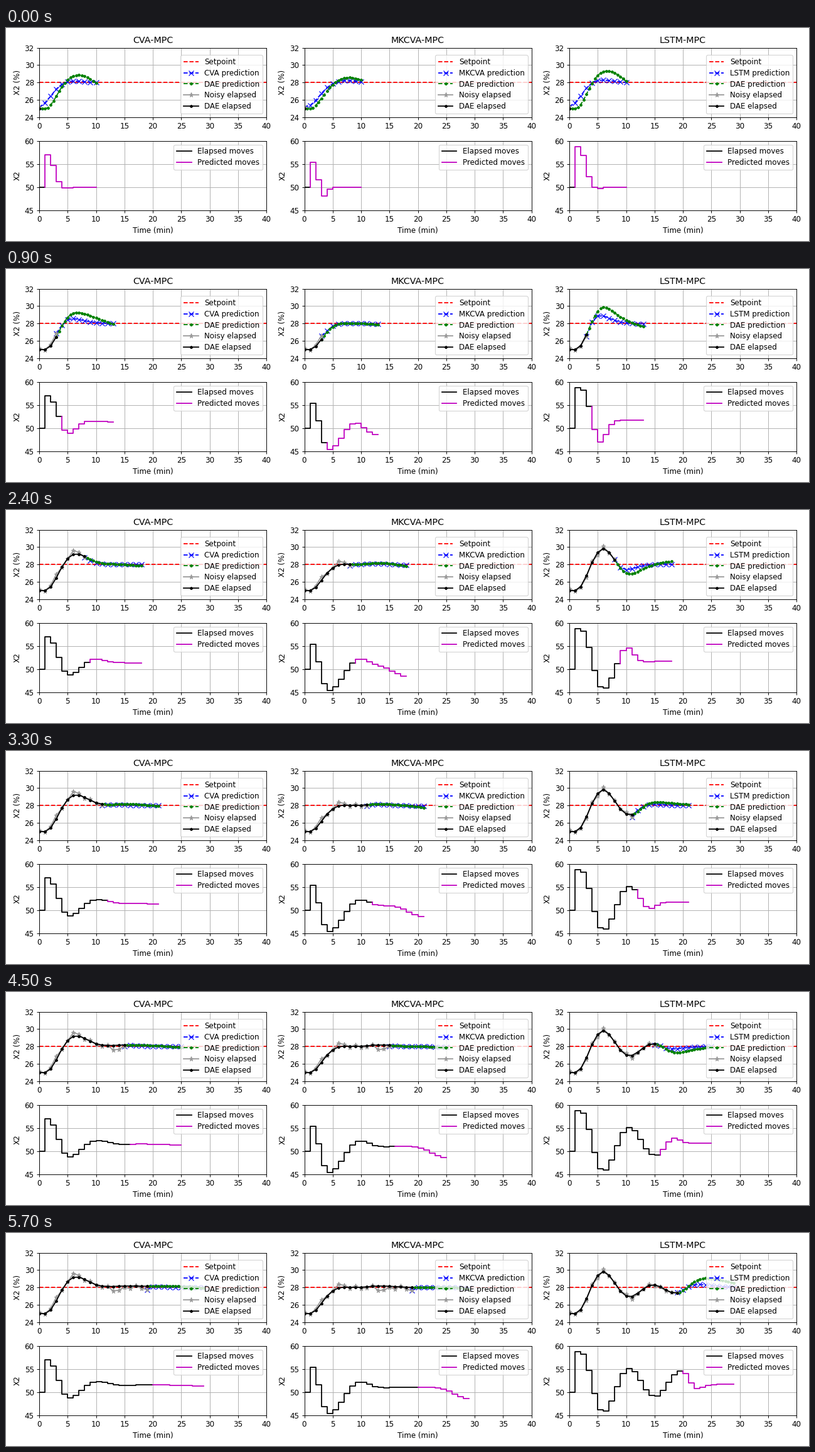
Recreate the animation shown at these times as a matplotlib script. Size 1280 by 341 pixels, loop 6000 ms.

```python
import numpy as np
import matplotlib.pyplot as plt
from matplotlib.animation import FuncAnimation

W, H, DPI = 1280, 341, 85.25
STEPS, INTERVAL = 20, 300
HORIZON = 10
SETPOINT, START, IDLE = 28, 25, 50


def ease(points, t):
    """Cosine easing through the turning points, held past the ends."""
    x, y = np.array(points, float).T
    i = np.clip(np.searchsorted(x, t, side="right") - 1, 0, len(x) - 2)
    s = np.clip((t - x[i]) / (x[i + 1] - x[i]), 0, 1)
    return y[i] + (y[i + 1] - y[i]) * (1 - np.cos(np.pi * s)) / 2


class Loop:
    """One controller driving a damped second-order plant."""

    def __init__(self, turns, rest, reach, power, fade, plant, seed, noise):
        self.rest, self.reach, self.power, self.fade = rest, reach, power, fade
        self.gain, self.bias, self.spring, self.damp = plant
        self.moves = ease(turns, np.arange(STEPS + HORIZON))
        self.moves[0] = IDLE
        half_steps, self.speed = self.simulate(0, START, 0, self.moves[:STEPS])
        self.plant = half_steps[::2]
        error = noise * np.random.RandomState(seed).randn(STEPS)
        self.noisy = self.plant[:STEPS] + error

    def simulate(self, t0, y, p, moves):
        """Plant output at every half minute, and its slope at every minute."""
        ys, ps = [], []
        for t, u in enumerate(moves, t0):
            push = self.gain * (u - IDLE + self.bias) if t else 0
            a = push - self.spring * (y - START) - self.damp * p
            ys += [y, y + p / 2 + a / 8]
            ps.append(p)
            y, p = y + p + a / 2, p + a
        return np.array(ys + [y]), ps

    def plan(self, k):
        """Moves to come: the true course fading into a resting level."""
        ahead = np.arange(HORIZON - 1)
        rest = self.rest if k else IDLE
        reach = min(self.reach, 2.4 + 2 * k)
        keep = np.exp(-(ahead / reach) ** self.power)
        return rest + (self.moves[k + 1:k + HORIZON] - rest) * keep

    def predict(self, k, plan):
        moves = np.r_[self.moves[k], plan]
        plant, _ = self.simulate(k, self.plant[k], self.speed[k], moves)
        pull = np.exp(-np.arange(HORIZON + 1) / self.fade)
        model = SETPOINT + (plant[::2] - SETPOINT) * pull
        model[0] = self.noisy[k]
        return model, plant


def axes_at(left, top):
    ax = fig.add_axes([left / W, 1 - (top + 111.4) / H, 362 / W, 111.4 / H])
    ax.set_xlim(0, 40)
    ax.set_xticks(range(0, 41, 5))
    ax.grid(True)
    return ax


class Panel:
    def __init__(self, col, name, loop):
        self.loop = loop
        left = 53 + 422.5 * col
        top = axes_at(left, 31.6)
        top.set_title(name + "-MPC")
        top.set_ylim(24, 32)
        top.set_yticks(range(24, 33, 2))
        top.set_ylabel("X2 (%)")
        top.plot([0, 40], [SETPOINT] * 2, "r--", label="Setpoint")
        self.model, = top.plot([], [], "b--x", label=name + " prediction")
        self.plant, = top.plot([], [], "g--.", label="DAE prediction")
        self.noisy, = top.plot([], [], "-*", color="0.6", label="Noisy elapsed")
        self.past, = top.plot([], [], "k.-", label="DAE elapsed")
        top.legend(loc="lower right", labelspacing=0.41)

        low = axes_at(left, 180.7)
        low.set_ylim(45, 60)
        low.set_yticks(range(45, 61, 5))
        low.set_ylabel("X2")
        low.set_xlabel("Time (min)")
        self.done, = low.plot([], [], "k-", label="Elapsed moves")
        self.next, = low.plot([], [], "m-", label="Predicted moves")
        low.legend(loc="upper right", labelspacing=0.41)

    def show(self, k):
        loop = self.loop
        past = np.arange(k + 1)
        self.noisy.set_data(past, loop.noisy[:k + 1])
        self.past.set_data(past, loop.plant[:k + 1])

        plan = loop.plan(k)
        model, plant = loop.predict(k, plan)
        self.model.set_data(k + np.arange(HORIZON + 1), model)
        self.plant.set_data(k + np.arange(2 * HORIZON + 1) / 2, plant)

        edges = np.repeat(np.arange(k + HORIZON + 1), 2)
        levels = np.repeat(np.r_[loop.moves[:k + 1], plan], 2)
        cut = 2 * k + 2
        self.done.set_data(edges[1:cut + 1], levels[:cut])
        self.next.set_data(edges[cut:-1], levels[cut - 1:])


fig = plt.figure(figsize=(W / DPI, H / DPI), dpi=DPI, facecolor="white")

cva = Loop(turns=[(1, 57), (4.8, 48.75), (9.5, 52.3), (14.5, 51.5), (20, 51.65)],
           rest=51.4, reach=3.5, power=2, fade=4,
           plant=(0.118, 0, 0.06, 0.22), seed=42, noise=0.27)
mkcva = Loop(turns=[(0.6, 55.8), (3.8, 45.4), (9.2, 52.2), (13.2, 51), (19, 51.1)],
             rest=48.3, reach=6.5, power=4, fade=8,
             plant=(0.033, 16, 0.185, 0.41), seed=42, noise=0.27)
lstm = Loop(turns=[(1.5, 58.7), (5.5, 45.7), (10, 55.1), (14.5, 49.1), (19.2, 54.6), (23, 49)],
            rest=51.7, reach=2.5, power=2, fade=4,
            plant=(0.108, 0, 0.06, 0.28), seed=1, noise=0.15)

panels = [Panel(i, name, loop) for i, (name, loop) in
          enumerate([("CVA", cva), ("MKCVA", mkcva), ("LSTM", lstm)])]


def update(k):
    for panel in panels:
        panel.show(k)
    return []


anim = FuncAnimation(fig, update, frames=STEPS, interval=INTERVAL,
                     init_func=lambda: update(0), repeat=True, repeat_delay=0, blit=False)
plt.show()
```
